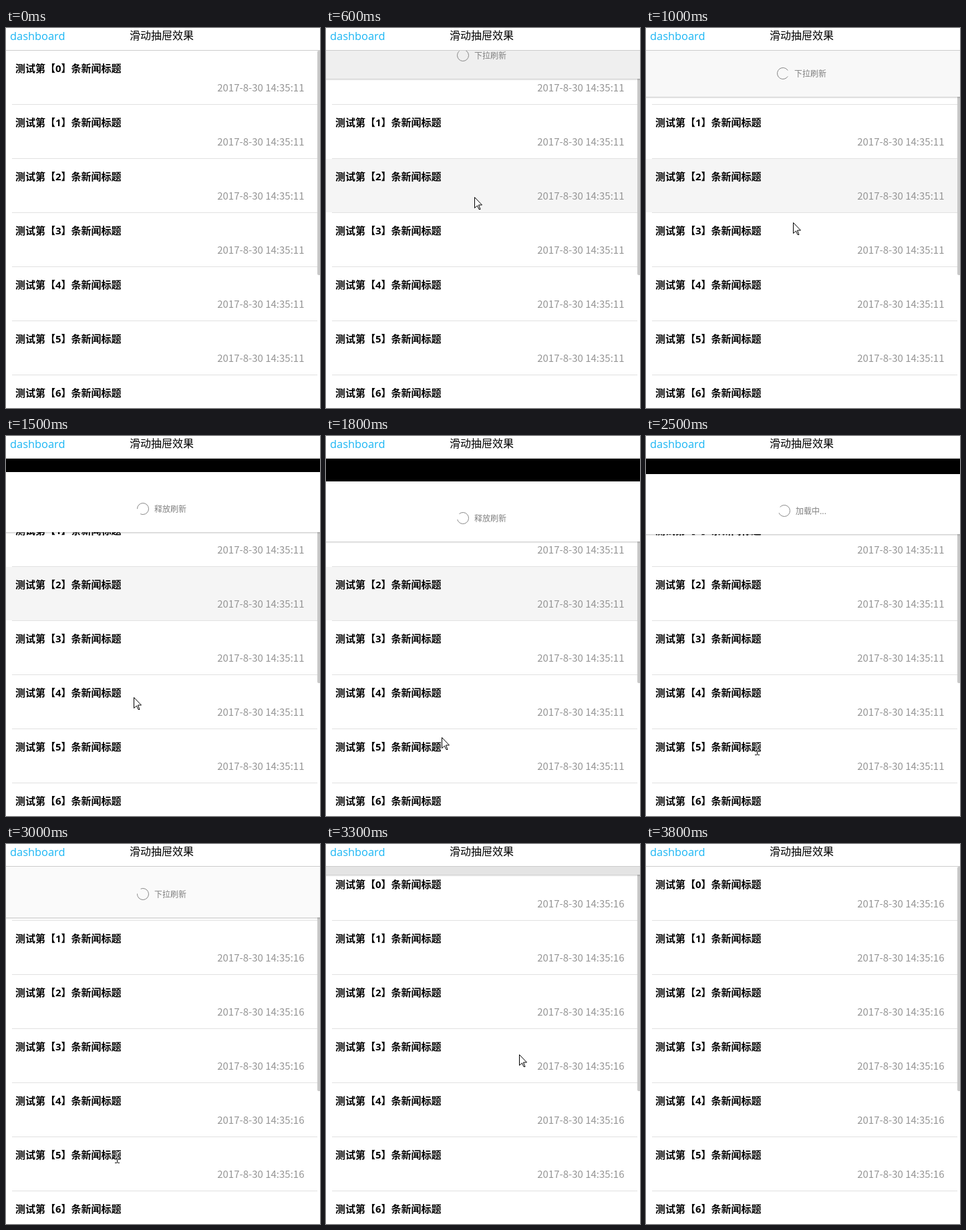
Recreate the animation shown at these times as an HTML page with a canvas. Size 470 px wide and 569 px high, loop 4.2 s.

```html
<!DOCTYPE html>
<html lang="zh-CN">
<head>
<meta charset="utf-8">
<style>
  html, body { margin: 0; width: 100%; height: 100%; overflow: hidden; background: #fff; }
  canvas { display: block; }
</style>
</head>
<body>
<canvas id="stage" width="470" height="569"></canvas>
<script>
const ctx = document.getElementById('stage').getContext('2d');
const W = 470, H = 569, LOOP = 4200, STEP = 100;
const TOP = 34, ROW = 81, DRAWER = 90;
const PRESS = 200, RELEASE = 2400, LOADED = 3000, CLOSED = 3500, LEAVE = 3800;
const CJK = '"Noto Sans CJK SC", "Noto Sans CJK", sans-serif';
const LATIN = `"Open Sans", ${CJK}`;

const mix = (a, b, u) => a + (b - a) * Math.min(1, Math.max(0, u));

// Moves evenly from one point to another between two times
function glide(t, start, end, [x1, y1], [x2, y2]) {
  const u = (t - start) / (end - start);
  return [Math.round(mix(x1, x2, u)), Math.round(mix(y1, y2, u))];
}

function pointerAt(t) {
  if (t < 1000) return glide(t, PRESS, 1000, [223, 214], [220, 291]);
  if (t < 1800) return glide(t, 1000, 1800, [220, 291], [173, 451]);
  if (t < LOADED) return glide(t, 1800, 2200, [173, 451], [165, 469]);
  return glide(t, LOADED, 3700, [166, 469], [453, 110]);
}

// Rubber band while dragged, settling while loading, then closing
function pullAt(t) {
  if (t < RELEASE) {
    const drag = pointerAt(t)[1] - 214;
    return Math.round(201 * drag / (drag + 147));
  }
  if (t < LOADED) return Math.round(DRAWER + 38 * Math.exp((2300 - t) / 400));
  const left = Math.max(0, (CLOSED - t) / (CLOSED - LOADED));
  return Math.round(76 * left ** 2);
}

function rect(color, x, y, w, h) {
  ctx.fillStyle = color;
  ctx.fillRect(x, y, w, h);
}

function text(str, x, y, font, color, align = 'left') {
  ctx.font = font;
  ctx.fillStyle = color;
  ctx.textAlign = align;
  ctx.fillText(str, x, y);
}

function drawList(t) {
  const date = '2017-8-30 14:35:' + (t < LOADED ? 11 : 16);
  for (let i = 0; i < 7; i++) {
    const y = TOP + i * ROW;
    if (i === 2 && t > PRESS && t < RELEASE) rect('#f5f5f5', 0, y, 466, ROW - 1);
    text(`测试第【${i}】条新闻标题`, 14, y + 32, `bold 15px ${LATIN}`, '#000');
    text(date, 446.5, y + 61, `15px ${CJK}`, '#959595', 'right');
    rect('#e1e1e1', 9, y + ROW - 1, 457, 1);
  }
  ctx.fillStyle = '#c8c8c8';
  ctx.beginPath();
  ctx.roundRect(466, TOP, 5, 336, 2);
  ctx.fill();
}

function drawDrawer(t) {
  const pull = pullAt(t);
  if (!pull) return;
  const bottom = TOP + pull, top = bottom - DRAWER, mid = bottom - 35;
  const dragging = t < RELEASE;
  const loading = !dragging && t < LOADED;
  const shift = loading ? 2 : 0;
  const shade = Math.round(255 - Math.max(0, DRAWER - pull) * 0.34);

  ctx.save();
  ctx.beginPath();
  ctx.rect(0, TOP, W, H);
  ctx.clip();
  ctx.shadowColor = 'rgba(0,0,0,.45)';
  ctx.shadowBlur = 3;
  rect(`rgb(${shade},${shade},${shade})`, -5, top, W + 10, DRAWER);
  ctx.shadowColor = 'transparent';
  if (top > TOP) rect('#000', 0, TOP, W, top - TOP);

  const degrees = dragging ? (pull - 69) * 3.6 : 190 + (t - 2500) * 0.77;
  const gap = degrees * Math.PI / 180;
  ctx.strokeStyle = '#888';
  ctx.lineWidth = 1;
  ctx.beginPath();
  ctx.arc(205 + shift, mid, 8.5, gap + 0.55, gap + 2 * Math.PI - 0.55);
  ctx.stroke();

  const label = loading ? '加载中...' : dragging && pull >= DRAWER ? '释放刷新' : '下拉刷新';
  text(label, 222 + shift, mid + 5, `12px ${CJK}`, '#808080');
  ctx.restore();
}

function drawHeader() {
  rect('#fff', 0, 0, W, TOP - 1);
  rect('#ccc', 0, TOP - 1, W, 1);
  text('dashboard', 6, 18, `16.4px ${LATIN}`, '#1ab6f4');
  text('滑动抽屉效果', 185, 17, `16px ${CJK}`, '#000');
}

function drawPointer(t) {
  if (t < STEP || t >= LEAVE) return;
  const [x, y] = pointerAt(t);
  ctx.save();
  ctx.translate(x, y);
  if (t >= RELEASE && t <= LOADED) {
    // The text caret inverts what lies below
    ctx.translate(166 - x, 0);
    ctx.globalCompositeOperation = 'difference';
    rect('#fff', 0, -7, 1, 15);
    for (const end of [-8, 8]) {
      rect('#fff', -3, end, 3, 1);
      rect('#fff', 1, end, 3, 1);
    }
  } else {
    ctx.translate(0.5, 0.5);
    ctx.fillStyle = '#fff';
    ctx.strokeStyle = '#000';
    ctx.lineWidth = 1;
    const arrow = new Path2D('M0 0V16L4 12.5L6.5 18H8.5L6 11.5H11Z');
    ctx.fill(arrow);
    ctx.stroke(arrow);
  }
  ctx.restore();
}

function frame(now) {
  const t = Math.floor(now % LOOP / STEP) * STEP;
  rect('#fff', 0, 0, W, H);
  drawList(t);
  drawDrawer(t);
  drawHeader();
  drawPointer(t);
  requestAnimationFrame(frame);
}
requestAnimationFrame(frame);
</script>
</body>
</html>
```
